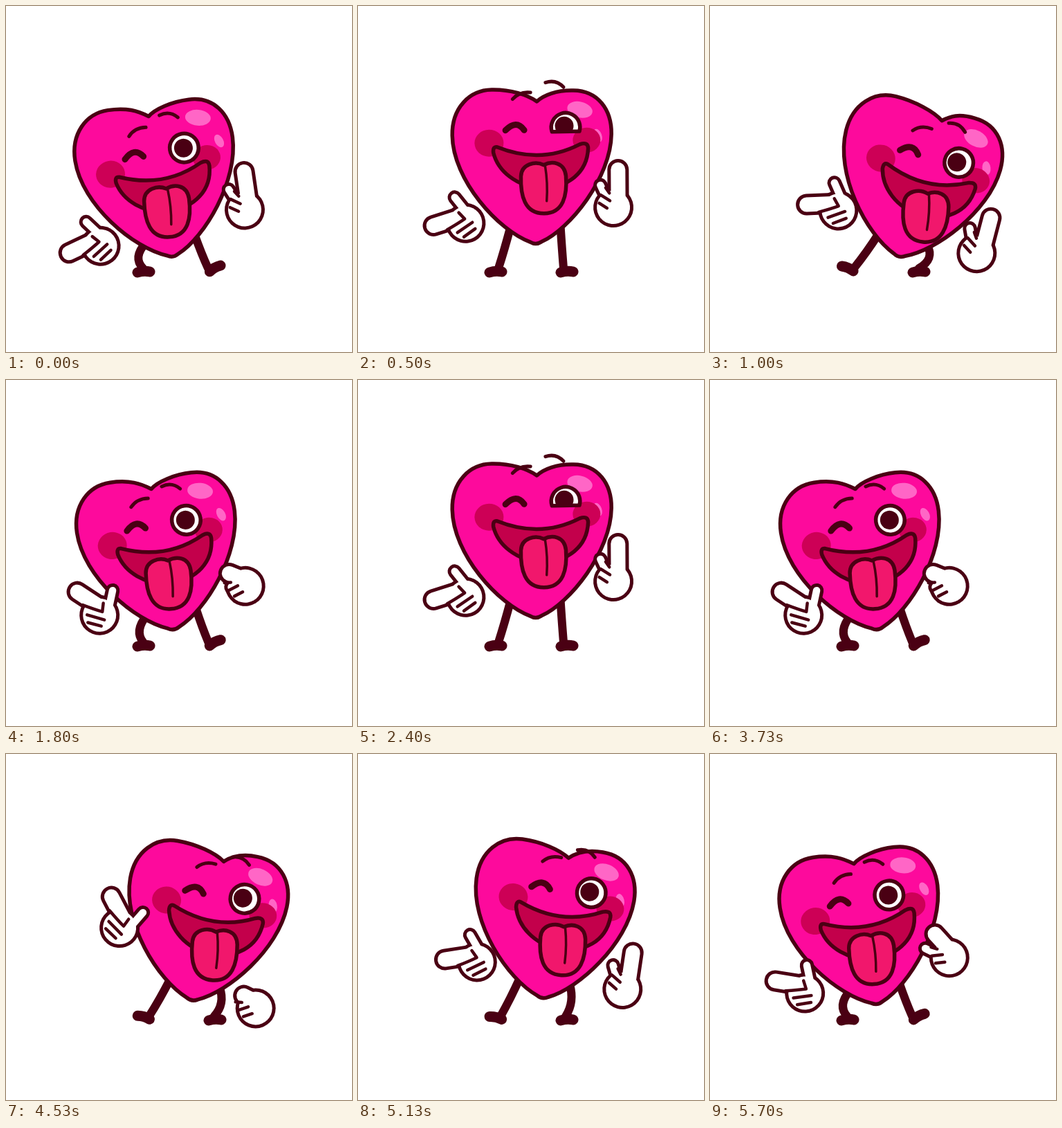
An HTML page with a canvas for the animation above (5730 ms loop, 500 by 500 pixels).

```html
<!DOCTYPE html>
<html lang="en">
<head>
<meta charset="utf-8">
<title>Dancing heart</title>
<style>
html, body { margin: 0; width: 100%; height: 100%; overflow: hidden; background: #fff; }
canvas { display: block; width: 500px; height: 500px; }
</style>
</head>
<body>
<canvas id="stage" width="500" height="500"></canvas>
<script>
const ctx = document.getElementById('stage').getContext('2d');
const LOOP = 5730, CYCLE = 48, BEAT = 24;
const DARK = '#4a0013', PINK = '#fd0a9c', SHINE = '#ff66c6', BLUSH = '#cd0056',
      MOUTH = '#c3004b', TONGUE = '#f1176c', WHITE = '#fff';

const clamp = v => Math.max(0, Math.min(1, v));
const ramp = (from, to, v) => {
  const u = clamp((v - from) / (to - from));
  return u * u * (3 - 2 * u);
};
// One out-and-back push lasting ten steps.
const push = v => v > 0 && v < 10 ? Math.sin(v * Math.PI / 10) ** 2 : 0;

function at(x, y, deg, draw) {
  ctx.save();
  ctx.translate(x, y);
  ctx.rotate(deg * Math.PI / 180);
  draw();
  ctx.restore();
}
function paint(path, fill, width, color = DARK) {
  const p = new Path2D(path);
  if (fill) { ctx.fillStyle = fill; ctx.fill(p); }
  if (width) { ctx.strokeStyle = color; ctx.lineWidth = width; ctx.stroke(p); }
}
function oval(x, y, rx, ry, fill, deg = 0) {
  ctx.fillStyle = fill;
  ctx.beginPath();
  ctx.ellipse(x, y, rx, ry, deg * Math.PI / 180, 0, 7);
  ctx.fill();
}

// Sway runs from -1 (left) to 1 (right); drop is 0 at the top of the hop.
function poseAt(step) {
  const c = -Math.cos(step / CYCLE * 2 * Math.PI);
  const sway = c + .9 * Math.max(c, 0) ** 2 * (1 - c);
  const drop = sway ** 2 * (1.5 - .5 * sway ** 2);
  const q = step % BEAT, swing = ramp(12, 17, q);
  return {
    sway, drop,
    right: Math.max(sway, 0),
    x: 257 + 15.5 * sway,
    y: 345 + 18.5 * drop,
    tilt: -1 + 11.5 * sway + 3.5 * drop,
    flip: swing * (1 - ramp(20, 24, q)),
    raise: swing * (1 - ramp(17, 22, q)),
    leftPush: push(step),
    rightPush: push(step - BEAT)
  };
}

function leg(side, { x, y, tilt, sway }) {
  const a = tilt * Math.PI / 180, cos = Math.cos(a), sin = Math.sin(a);
  const hipX = x + 36 * side * cos + 27 * sin, hipY = y + 36 * side * sin - 27 * cos;
  const ankleX = 250 + 47 * side + 5 * sway, ankleY = 379;
  const bend = Math.max(0, side * sway), heel = Math.max(0, -side * sway);
  const kneeX = (hipX + ankleX) / 2 + 17 * side * bend, kneeY = (hipY + ankleY) / 2 + 3;
  paint(`M${hipX},${hipY} Q${kneeX},${kneeY} ${ankleX},${ankleY}`, null, 12);
  at(250.5 + 51.5 * side, 384 - 5 * heel, -26 * side * heel,
    () => paint('M-9,1 Q0,-2 9,0', null, 15));
}

function body({ sway }) {
  const cleft = 5 + 8 * sway;
  paint(`M-8,-4 C-54,-22 -118,-95 -118,-160 C-118,-200 -92,-225 -60,-225
    C-32,-225 ${cleft - 14},-217 ${cleft},-207 C${cleft + 10},-216 34,-223 58,-222
    C94,-221 113,-193 112,-158 C110,-95 50,-22 8,-4 Q0,1 -8,-4Z`, PINK, 5.5);
  oval(67, -194, 18.5, 11.5, SHINE, 14);
  oval(92, -156, 6, 10, SHINE, -20);
}

function eye({ sway, drop }) {
  const lid = Math.asin(clamp(.3 + Math.abs(sway) * 1.3));
  const rim = new Path2D();
  rim.arc(0, 0, 20.8, Math.PI - lid, lid + 2 * Math.PI);
  rim.closePath();
  ctx.fillStyle = WHITE;
  ctx.fill(rim);
  ctx.save();
  ctx.clip(rim);
  oval(-2 - sway, 2 * drop - 2, 13.5, 13.5, DARK);
  ctx.restore();
  ctx.strokeStyle = DARK;
  ctx.lineWidth = 5.5;
  ctx.stroke(rim);
}

function face(pose) {
  const { sway, drop, tilt } = pose, browLift = 13 * (1 - drop);
  oval(-65, -133, 21, 19.5, BLUSH);
  oval(76, -135, 20, 18, BLUSH);
  at(46, -154, 0, () => eye(pose));
  at(-27, -154, 0, () => paint('M-14,3 Q2,-13 13,3', null, 9));
  at(-17, -188 - browLift, 0, () => paint('M-13,5 Q-3,-6 13,-4', null, 5));
  at(31, -203 - browLift, 0, () => paint('M-13,-3 Q2,-8 13,4', null, 5));
  at(9, -123, 0, () => paint(
    `M-62,-4 Q0,22 57,-6 Q69,-10 69,0 C67,36 38,56 2,56
     C-36,54 -62,30 -68,4 Q-69,-6 -62,-4Z`, MOUTH, 5.5));
  at(13 + 5 * sway, -66, -tilt * .6, () => {
    paint(`M0,-34 C-12,-40 -32,-36 -33,-18 C-34,10 -28,36 0,36
      C28,36 34,10 32,-18 C30,-38 12,-40 0,-34Z`, TONGUE, 5.5);
    paint('M2,-33 Q6,-8 4,18', null, 3.5);
  });
}

// A glove: outlined finger and thumb strokes over a round palm.
function glove(finger, thumb, creases) {
  for (const [grow, color] of [[5, DARK], [0, WHITE]]) {
    oval(0, 0, 24 + grow, 24 + grow, color);
    paint(finger, null, 21 + 2 * grow, color);
    paint(thumb, null, 10.5 + 2 * grow, color);
  }
  paint(creases, null, 4.5);
}

function leftHand({ flip, raise, right, leftPush }) {
  at(-101 - 20 * raise - 48 * leftPush, -33 - 45 * raise - 12 * right, -29 + 69 * flip,
    () => glove('M-6,-12 L-42,-20', 'M9,-14 L5,-40',
      'M-28,-5 Q-10,-5 2,-6 L-1,-18 M-17,6 L9,4 M-12,16 L8,14'));
}

function rightHand({ flip, raise, right, rightPush }) {
  const length = 62 - 30 * flip, thumb = clamp((length - 34) / 10);
  at(113 - 16 * raise - 6 * right + 10 * rightPush,
    -52 + 35 * raise + 15 * right + 38 * rightPush, 7 - 62 * flip,
    () => glove(`M6,-10 L1,${7 - length}`, `M-10,-10 L${-10 - 12 * thumb},${-10 - 20 * thumb}`,
      'M-14,-27 L-8,-20 M-20,-16 L-6,-9 M-21,-4 L-9,2'));
}

function draw(step) {
  const pose = poseAt(step);
  ctx.fillStyle = WHITE;
  ctx.fillRect(0, 0, 500, 500);
  ctx.lineCap = ctx.lineJoin = 'round';
  leg(-1, pose);
  leg(1, pose);
  at(pose.x, pose.y, pose.tilt, () => {
    body(pose);
    at(5.5 * pose.sway, -15 * (1 - pose.drop), 0, () => face(pose));
    leftHand(pose);
    rightHand(pose);
  });
}

// 25 poses a second shown on a 30 Hz clock: every fifth pose stays for two ticks.
function stepAt(t) {
  const tick = Math.floor((t + 5) * .03);
  return Math.floor(tick / 6) * 5 + Math.max(0, tick % 6 - 1);
}

const start = performance.now();
(function play() {
  draw(stepAt((performance.now() - start) % LOOP) % CYCLE);
  requestAnimationFrame(play);
})();
</script>
</body>
</html>
```
